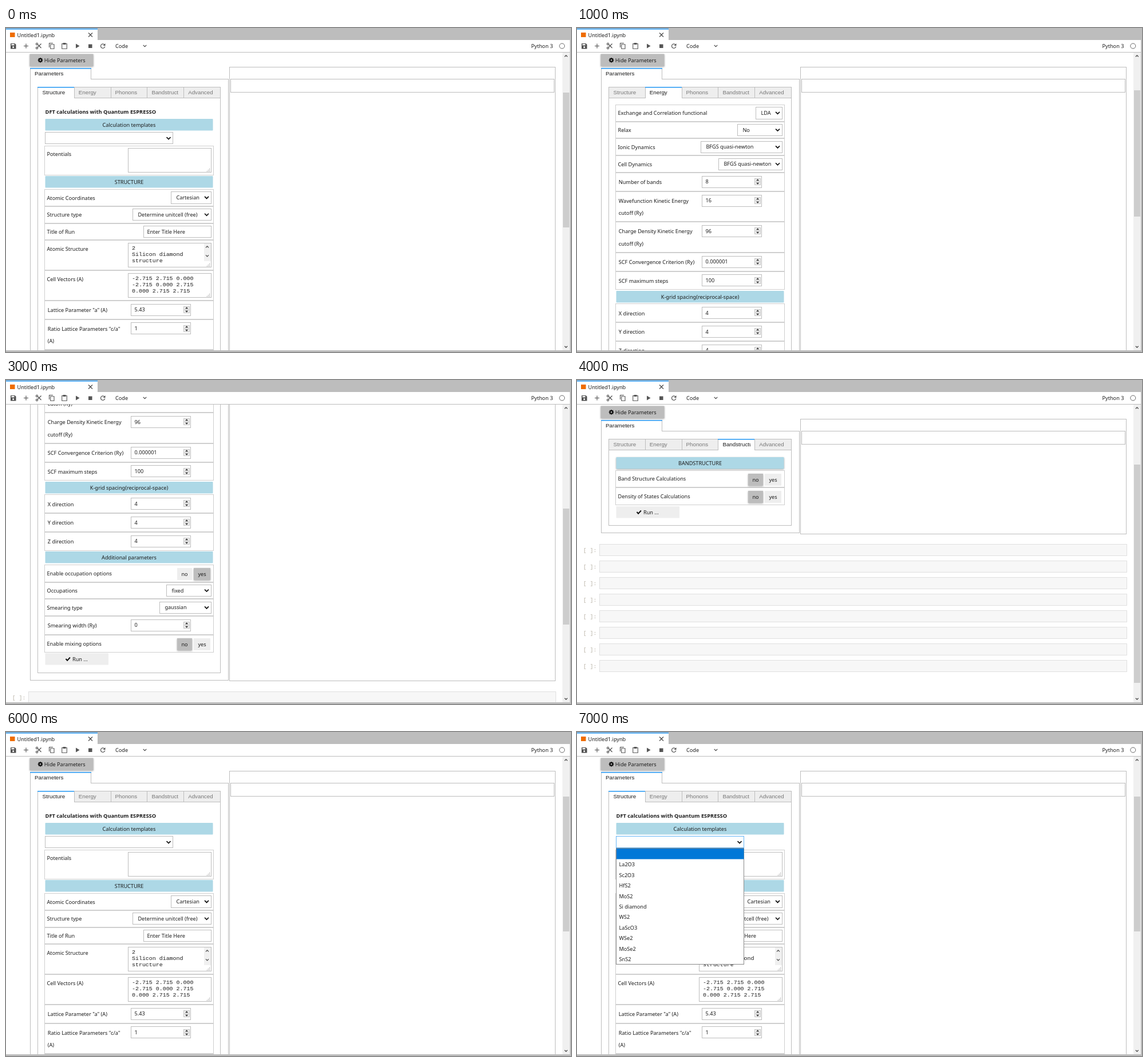
Recreate the animation shown at these times as an HTML page. Size 987 px wide and 567 px high, loop 8 s.

```html
<!DOCTYPE html>
<html lang="en">
<head>
<meta charset="utf-8">
<title>Notebook parameter form</title>
<style>
html, body { margin: 0; width: 100%; height: 100%; overflow: hidden; background: #fff; }
svg { display: block; width: 987px; height: 567px; }
text { font: 9.15px "Noto Sans", "Open Sans", sans-serif; fill: #1c1c1c; white-space: pre; }
.tab { font: 9.75px "Liberation Sans", Arial, sans-serif; }
.dim { fill: #777; }
.mono { font: 9.95px "Liberation Mono", "Courier New", monospace; }
.prompt { fill: #b9b2a6; }
.live { fill: #307fc1; }
.bold { font-weight: 700; font-size: 9.3px; }
.mid { text-anchor: middle; }
.raised { filter: drop-shadow(0 1.5px 1.5px rgba(0, 0, 0, .35)); }
</style>
</head>
<body>
<svg viewBox="0 0 987 567">
  <defs>
    <clipPath id="view"><rect x="0" y="43" width="972" height="521"/></clipPath>
    <clipPath id="tabText"><rect x="247" y="104" width="56.5" height="18"/></clipPath>
  </defs>
  <rect width="987" height="567" fill="#fff"/>
  <g id="page" clip-path="url(#view)"></g>
  <g id="frame"></g>
  <g id="bar"></g>
</svg>
<script>
const el = id => document.getElementById(id);
const BLUE = '#2196f3', EDGE = '#bdbdbd';
const snap = v => Math.round(v) + .5;

const fill = (x, y, w, h, color, extra = '') =>
  `<rect x="${x}" y="${y}" width="${w}" height="${h}" fill="${color}" ${extra}/>`;
const box = (x, y, x2, y2, stroke = EDGE, bg = '#fff') => {
  const l = snap(x), t = snap(y);
  return fill(l, t, snap(x2) - l, snap(y2) - t, bg, `stroke="${stroke}"`);
};
// y is the middle of the line of text
const text = (x, y, str, cls = '') =>
  `<text x="${x}" y="${Math.round(y + 3.3)}" class="${cls}">${str}</text>`;
const line = (d, color = '#222', w = 1, bg = 'none') =>
  `<path d="${d}" fill="${bg}" stroke="${color}" stroke-width="${w}"/>`;
const arrow = (x, y, s = 3.5, w = 1.7, dir = 1, color = '#111') =>
  line(`M${x - s} ${y - dir * s / 2}l${s} ${dir * s}l${s} ${-dir * s}`, color, w);

// Form builder: each call draws at the cursor and moves it down
function form(y) {
  let out = '';
  const row = (h, label, lx, ly) => {
    out += box(67, y, 362, Math.round(y + h) - 1, '#cfcfcf');
    label.split('|').forEach((s, i) => out += text(lx, y + ly + i * 21.2, s));
  };
  const f = {
    skip(n) { y += n; return f; },
    add(s) { out += s; return f; },
    head(str, raised) {
      out += fill(68.5, Math.round(y + 1.5), 293, 20.5, '#add8e6', `rx="1" ${raised ? 'class="raised"' : ''}`);
      out += text(215, y + 11.8, str, 'mid');
      y += 24;
      return f;
    },
    select(label, x, value, stroke) {
      row(29.8, label, 71.5, 15.3);
      out += box(x, y + 4.5, 358, y + 24.7, stroke) + text(x + 9.4, y + 14.7, value) + arrow(350.5, y + 14.8);
      y += 29.8;
      return f;
    },
    input(label, value) {
      row(29.8, label, 71.5, 15.3);
      out += box(240, y + 4.5, 358, y + 24.7) + text(246.4, y + 14.7, value);
      y += 29.8;
      return f;
    },
    number(label, value) {
      const h = label.includes('|') ? 53.5 : 32.8, c = Math.round(y + 16);
      row(h, label, 72.8, 16.8);
      out += box(218, y + 5.7, 322, y + 25.7) + text(224.6, y + 16, value);
      out += box(310, c - 6, 320, c + 5, '#c4c4c4', '#f0f0f0') + line(`M310.5 ${c}h10`, '#c4c4c4');
      out += `<path d="M313 ${c - 1.8}l2.600 -3l2.600 3zM313 ${c + 1.8}l2.600 3l2.600 -3z" fill="#333"/>`;
      y += h;
      return f;
    },
    area(label, lines, scroll) {
      row(52.8, label, 71.5, 15.5);
      const t = y + 4.4, b = Math.round(t + 42);
      out += box(213, t, 358, b);
      lines.forEach((s, i) => out += text(220, t + 8.8 + i * 11.3, s, 'mono'));
      if (scroll) out += fill(346, Math.round(t) + 1, 12, 31, '#f0f0f0')
        + arrow(351.5, t + 7.5, 2.5, 1.2, -1, '#444') + arrow(351.5, t + 23, 2.5, 1.2, 1, '#444');
      for (let i = 0; i < 3; i++)
        for (let j = 0; j <= i; j++) out += fill(355 - j * 2.2, b - 6 + i * 2.1, 1.1, 1.1, '#999');
      y += 52.8;
      return f;
    },
    toggle(label, yes) {
      row(30.8, label, 71.5, 15.6);
      const t = Math.round(y + 6);
      const btn = (x, w, str, on) => {
        out += fill(x, t, w, 21, on ? '#bdbdbd' : '#eee', on ? 'class="raised"' : '');
        out += text(x + w / 2, t + 10.5, str, 'mid');
      };
      if (yes) { btn(299, 26, 'no', false); btn(328, 29, 'yes', true); }
      else { btn(328, 29, 'yes', false); btn(299, 26, 'no', true); }
      y += 30.8;
      return f;
    },
    run() {
      const t = Math.round(y + 1.7);
      out += fill(68.5, t, 110.5, 20.5, '#eee') + text(116, t + 10.3, 'Run ...');
      out += line(`M104.5 ${t + 10}l2.6 2.8l4.8 -5.3`, '#111', 2);
      return f;
    },
    done: () => ({ out, y })
  };
  return f;
}

function structure(open) {
  const f = form(157.5)
    .add(text(68.5, 146.3, 'DFT calculations with Quantum ESPRESSO', 'bold'))
    .head('Calculation templates')
    .add(box(68, 182, 291, 202, open ? '#64b5f6' : EDGE) + arrow(284, 192.8))
    .skip(24.1)
    .area('Potentials', []).skip(-.5)
    .head('STRUCTURE')
    .select('Atomic Coordinates', 288, 'Cartesian')
    .select('Structure type', 221, 'Determine unitcell (free)')
    .input('Title of Run', 'Enter Title Here')
    .area('Atomic Structure', ['2', 'Silicon diamond', 'structure'], true)
    .area('Cell Vectors (A)', ['-2.715 2.715 0.000', '-2.715 0.000 2.715', '0.000 2.715 2.715'])
    .number('Lattice Parameter "a" (A)', '5.43')
    .number('Ratio Lattice Parameters "c/a"|(A)', '1')
    .number('', '');
  if (open) {
    const names = ['La2O3', 'Sc2O3', 'HfS2', 'MoS2', 'Si diamond', 'WS2', 'LaScO3', 'WSe2', 'MoSe2', 'SnS2'];
    f.add(box(68, 203, 291, 406, '#8a8a8a') + fill(69, 204, 222.5, 18.5, '#0078d7'));
    names.forEach((s, i) => f.add(text(73.5, 232 + i * 18.4, s)));
  }
  return f.skip(200).done();
}

function energy(occupied) {
  const f = form(133.8)
    .select('Exchange and Correlation functional', 312, 'LDA')
    .select('Relax', 280, 'No')
    .select('Ionic Dynamics', 216, 'BFGS quasi-newton')
    .select('Cell Dynamics', 247, 'BFGS quasi-newton')
    .number('Number of bands', '8')
    .number('Wavefunction Kinetic Energy|cutoff (Ry)', '16')
    .number('Charge Density Kinetic Energy|cutoff (Ry)', '96')
    .number('SCF Convergence Criterion (Ry)', '0.000001')
    .number('SCF maximum steps', '100')
    .head('K-grid spacing(reciprocal-space)');
  for (const axis of 'XYZ') f.number(axis + ' direction', '4');
  f.head('Additional parameters').toggle('Enable occupation options', occupied);
  if (occupied) f
    .select('Occupations', 280, 'fixed')
    .select('Smearing type', 268, 'gaussian')
    .number('Smearing width (Ry)', '0');
  return f.toggle('Enable mixing options').run().done();
}

const bands = () => form(133.5)
  .head('BANDSTRUCTURE', true)
  .toggle('Band Structure Calculations')
  .toggle('Density of States Calculations')
  .run().done();

const advanced = () => form(133.5)
  .head('ADVANCED')
  .select('Simulation venue', 299, 'Serial', '#64b5f6')
  .number('Number of nodes', '4')
  .input('Walltime', '1:00:00')
  .run().done();

function gear(x, y) {
  let s = `<circle cx="${x}" cy="${y}" r="2.3" fill="none" stroke="#111" stroke-width="2"/>`;
  for (let a = 0; a < 360; a += 45)
    s += fill(x - .9, y - 4.3, 1.8, 2, '#111', `transform="rotate(${a} ${x} ${y})"`);
  return s;
}

function page({ body, tab, dy = 0, live = -1 }) {
  const { out, y } = body;
  let s = fill(41.5, 45.5, 111, 21.5, EDGE, 'class="raised"') + gear(60, 56.3) + text(66.8, 56.3, 'Hide Parameters');
  s += box(390, 68, 959, y + 49.7) + box(392, 89, 957, 112);
  s += box(42, 89, 388, y + 48) + box(42, 70, 148, 89) + fill(43, 89, 105, 1, '#fff');
  s += fill(42, 70, 107, 1.5, BLUE) + text(50, 80, 'Parameters', 'tab');
  s += box(55, 122, 374, y + 35);
  ['Structure', 'Energy', 'Phonons', 'Bandstruct', 'Advanced'].forEach((name, i) => {
    const x = 55 + i * 63.8, on = i === tab, r = i === 4 ? 374 : x + 63.8;
    s += box(x, 103, r, 122, EDGE, on ? '#fff' : '#eee');
    if (on) s += fill(Math.round(x) + 1, 122, Math.round(r - x) - 1, 1, '#fff')
      + fill(Math.round(x), 103, Math.round(r - x) + 1, 1.5, BLUE);
    const full = on && i === 3;
    const t = text(i ? x + 8 : 63.5, 113, full ? 'Bandstructure' : name, on ? 'tab' : 'tab dim');
    s += full ? `<g clip-path="url(#tabText)">${t}</g>` : t;
  });
  s += out;
  for (let i = 0; i < 8; i++) {
    const t = Math.round(y + 68.3 + i * 29);
    s += box(39, t, 960, t + 20, '#e0e0e0', '#f7f7f7');
    s += text(10.7, t + 11, '[ ]:', 'mono ' + (i === live ? 'live' : 'prompt'));
  }
  return `<g transform="translate(0 ${dy})">${s}</g>`;
}

function toolbar() {
  const ink = '#555';
  let s = fill(0, 0, 987, 21, EDGE) + fill(0, 0, 160, 22, '#fff') + fill(0, 1, 160, 1.5, BLUE);
  s += fill(0, 0, 160, 1, EDGE) + fill(7, 8, 8.5, 8, '#ef6c00') + text(19.5, 12.3, 'Untitled1.ipynb');
  s += line('M144 8.5l7 7m0 -7l-7 7', '#444', 1.1);
  s += fill(0, 42, 985, 1, EDGE);
  // save
  s += '<path d="M8 27h7.5l2 2v7.5h-9.5z" fill="#505050"/>' + fill(9.5, 28, 5, 2.4, '#fff')
    + '<circle cx="12.7" cy="33.5" r="1.5" fill="#fff"/>';
  s += line('M31 31.5h8M35 27.5v8', ink, 1.2);
  // cut
  s += line('M54 27.5l7.5 7.5M61.5 27.5l-7.5 7.5', ink, 1.3);
  s += [28, 35].map(y => `<circle cx="54" cy="${y}" r="1.6" fill="#fff" stroke="${ink}" stroke-width="1.2"/>`).join('');
  // copy, paste
  s += line('M75.5 34v-7.5h6.5', ink, 1.1) + line('M77.7 28.7h6.3v7.6h-6.3z', ink, 1.1);
  s += line('M97.7 27.5h8.6v8.8h-8.6z', ink, 1.1) + fill(99.5, 26, 5, 3, ink);
  s += `<path d="M122 27.5l6.5 4l-6.5 4z" fill="${ink}"/>` + fill(144, 28.5, 6.5, 6.5, ink);
  // restart
  s += line('M172 29.2a3.7 3.7 0 1 0 .8 3.2', ink, 1.2) + `<path d="M173.5 27v4h-4z" fill="${ink}"/>`;
  s += text(191, 31.5, 'Code') + arrow(242.5, 31.3, 2.8, 1.2, 1, '#444');
  s += text(917.5, 31.5, 'Python 3');
  s += '<circle cx="971.3" cy="31.5" r="4.5" fill="none" stroke="#666"/>';
  s += fill(985, 21, 2, 546, EDGE) + fill(0, 564, 987, 3, EDGE);
  return s;
}

const scrollbar = (top, end) => fill(972, 43, 13, 521, '#f0f0f0') + fill(973, top, 11, end - top, '#cdcdcd')
  + arrow(978.3, 49, 2.4, 1.3, -1, '#444') + arrow(978.3, 558, 2.4, 1.3, 1, '#444');

const blank = { body: structure(false), tab: 0, thumb: [113, 349] };
const steps = [
  blank,
  { body: energy(false), tab: 1, thumb: [109, 330] },
  { body: energy(false), tab: 1, dy: -282, live: 1, thumb: [240, 461] },
  { body: energy(true), tab: 1, dy: -282, live: 1, thumb: [225, 428] },
  { body: bands(), tab: 3, thumb: [148, 530] },
  { body: advanced(), tab: 4, thumb: [143, 507] },
  blank,
  { ...blank, body: structure(true) }
];

el('frame').innerHTML = toolbar();
let shown = -1;
function draw(ms) {
  const i = Math.floor(ms % 8000 / 1000);
  if (i !== shown) {
    shown = i;
    el('page').innerHTML = page(steps[i]);
    el('bar').innerHTML = scrollbar(...steps[i].thumb);
  }
}
const start = performance.now();
function tick() {
  draw(performance.now() - start);
  requestAnimationFrame(tick);
}
tick();
</script>
</body>
</html>
```
